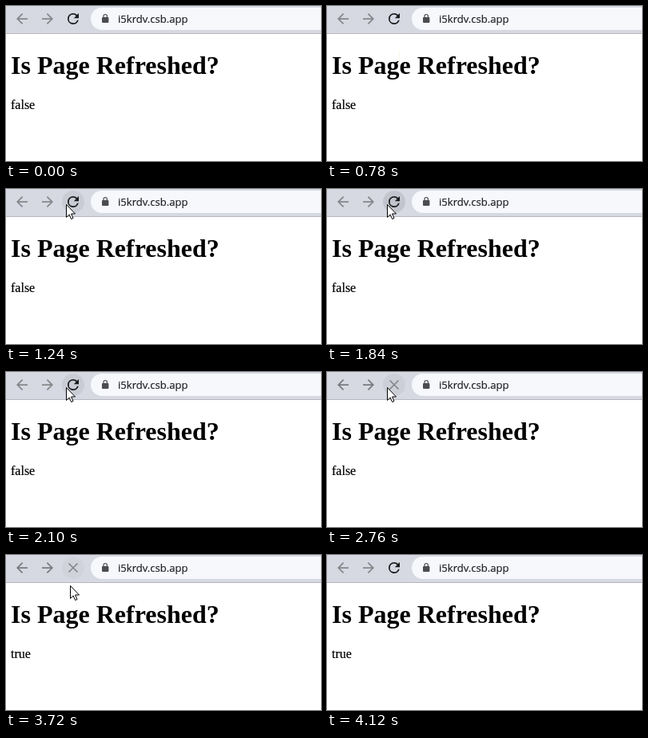
An HTML page that plays this animation: 394 by 194 pixels, repeating every 5200 ms.

```html
<!DOCTYPE html>
<html lang="en">
<head>
<meta charset="utf-8">
<title>Is Page Refreshed?</title>
<style>
html, body { margin: 0; width: 100%; height: 100%; overflow: hidden; background: #fff; }
svg { display: block; width: 394px; height: 194px; }
.page { font-family: "Liberation Serif", "Times New Roman", serif; fill: #000; }
.url { font: 13.1px "Open Sans", sans-serif; fill: #202124; stroke: #202124; stroke-width: .2px; }
#value { stroke: #000; stroke-width: .2px; }
</style>
</head>
<body>
<svg viewBox="0 0 394 194">
  <rect width="394" height="194" fill="#fff"/>
  <rect width="394" height="34" fill="#d6d9e2"/>
  <rect y="34" width="394" height="1" fill="#b9b4be"/>
  <rect x="106" y="2" width="320" height="28" rx="14" fill="#f6f8fc"/>
  <circle id="hover" cx="84" cy="16" r="14" fill="#77727a"/>
  <g id="arrows">
    <path d="M20 11H7.83l5.59-5.59L12 4l-8 8 8 8 1.41-1.41L7.83 13H20z" transform="translate(9.5 5.5) scale(.875)"/>
    <path d="M12 4l-1.41 1.41L16.17 11H4v2h12.17l-5.58 5.59L12 20l8-8z" transform="translate(41.5 5.5) scale(.875)"/>
  </g>
  <path id="reload" d="M17.65 6.35A7.96 7.96 0 0 0 12 4a8 8 0 1 0 7.73 10h-2.08A6 6 0 1 1 12 6c1.66 0 3.14.69 4.22 1.78L13 11h7V4z" transform="translate(73.5 5.5) scale(.875)" fill="#1b1b1e"/>
  <path id="stop" d="M78.5 10.5l11 11M89.5 10.5l-11 11" stroke="#85858a" stroke-width="1.7"/>
  <rect x="120" y="14" width="8.4" height="7" rx="1" fill="#4b4c50"/>
  <path d="M122 14.5V12.7a2.2 2.2 0 0 1 4.4 0V14.5" fill="none" stroke="#4b4c50" stroke-width="1.2"/>
  <text class="url" x="140" y="21">i5krdv.csb.app</text>
  <g id="page" class="page">
    <text x="6" y="85" font-size="32" font-weight="700">Is Page Refreshed?</text>
    <text id="value" x="6" y="129" font-size="16">false</text>
  </g>
  <path id="beam" d="M.5 -9V8" stroke="#fbf7e6"/>
  <path id="pointer" d="M.5 .5V16.5L4.2 13 6.6 18.6 9 17.5 6.6 12H11.5Z" fill="#fff" stroke="#000" stroke-linejoin="round"/>
</svg>
<script>
const LOOP = 5200;
const el = id => document.getElementById(id);
const hover = el("hover"), arrows = el("arrows"), reload = el("reload"), stop = el("stop");
const page = el("page"), value = el("value"), beam = el("beam"), pointer = el("pointer");

// mouse positions: time, x, y
const path = [[210, 124, 196], [720, 90, 65], [760, 90, 65], [1240, 75, 19], [3620, 75, 19], [4120, 122, 197]];

const ramp = (t, a, b) => Math.min(1, Math.max(0, (t - a) / (b - a)));
const ease = u => u * u * (3 - 2 * u);
const show = (node, on) => node.setAttribute("visibility", on ? "visible" : "hidden");

function mouseAt(t) {
  let [, x, y] = path[0];
  for (let i = 1; i < path.length; i++) {
    const [t0, x0, y0] = path[i - 1], [t1, x1, y1] = path[i];
    const u = ease(ramp(t, t0, t1));
    x += (x1 - x0) * u;
    y += (y1 - y0) * u;
  }
  return [Math.round(x), Math.round(y)];
}

function hoverAt(t) {
  const enter = ramp(t, 1080, 1240) * 0.12;
  const press = 0.07 * (ramp(t, 1440, 1620) - ramp(t, 1840, 2100));
  const rest = 0.06 * ramp(t, 2600, 2910);
  return (enter + press - rest) * (1 - ramp(t, 3700, 3860));
}

function draw(t) {
  const [x, y] = mouseAt(t);
  const present = t >= 230 && t < 4120;
  const onText = y >= 57 && y <= 93;
  const loading = t >= 2300 && t < 3780;
  const at = `translate(${x} ${y})`;
  pointer.setAttribute("transform", at);
  beam.setAttribute("transform", at);
  show(pointer, present && !onText);
  show(beam, present && onText);
  show(reload, !loading);
  show(stop, loading);
  show(page, t < 3300 || t >= 3340);
  arrows.setAttribute("fill", loading ? "#7b7b80" : "#87878b");
  hover.setAttribute("opacity", hoverAt(t));
  value.textContent = t < 3300 ? "false" : "true";
}

const start = performance.now();
function tick() {
  const t = (performance.now() - start) % LOOP;
  draw(Math.floor(t / 20) * 20);
  requestAnimationFrame(tick);
}
tick();
</script>
</body>
</html>
```
